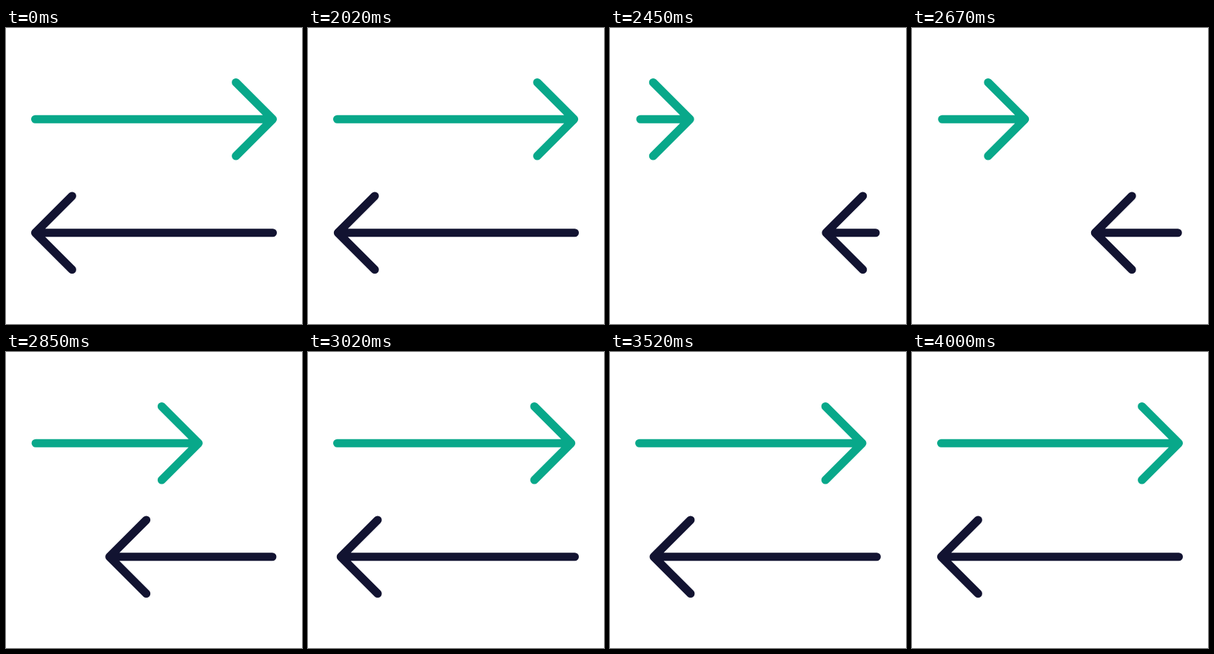
An HTML page that plays this animation: 400 by 400 pixels, repeating every 4.02 s.

```html
<!DOCTYPE html>
<html lang="en">
<head>
<meta charset="utf-8">
<title>Swap arrows</title>
<style>
  html, body { margin: 0; width: 100%; height: 100%; overflow: hidden; background: #fff; }
  svg { display: block; width: 100%; height: 100%; }
  path { fill: none; stroke-width: 11.16; stroke-linecap: round; stroke-linejoin: round; }
</style>
</head>
<body>
<svg viewBox="0 0 400 400">
  <path class="arrow" stroke="#08a88a"/>
  <path class="arrow" stroke="#121331" transform="rotate(180 200 200)"/>
</svg>
<script>
  const LOOP = 4020, STEP = 25;
  const TAIL = 39.53, TIP = 360.47, Y = 123.26, WING = 49.77;

  // [time in ms, shift of the tip in px]
  const KEYS = [[0, 0], [2000, 0], [2467, -253], [3200, 30.5], [3600, -24], [4000, 0], [LOOP, 0]];

  // cubic-bezier(.42, 0, .58, 1), solved by bisection
  function ease(x) {
    let lo = 0, hi = 1;
    for (let i = 0; i < 24; i++) {
      const s = (lo + hi) / 2, r = 1 - s;
      if (1.26 * s * r * r + 1.74 * s * s * r + s ** 3 < x) lo = s; else hi = s;
    }
    return lo * lo * (3 - 2 * lo);
  }

  function shiftAt(t) {
    const i = KEYS.findIndex(([time]) => time > t);
    const [t0, v0] = KEYS[i - 1], [t1, v1] = KEYS[i];
    return v0 === v1 ? v0 : v0 + (v1 - v0) * ease((t - t0) / (t1 - t0));
  }

  const arrows = document.querySelectorAll('.arrow');

  function draw(ms) {
    // 40 poses a second, starting on whole hundredths
    const pose = Math.floor((ms % LOOP + 5) / STEP);
    const shift = shiftAt(Math.floor(pose * STEP / 10) * 10);
    const tip = TIP + shift, back = tip - WING;
    const tail = TAIL - shift * 0.006;
    const d = `M${tail} ${Y}H${tip}M${back} ${Y - WING}L${tip} ${Y}L${back} ${Y + WING}`;
    arrows.forEach(a => a.setAttribute('d', d));
  }

  const start = performance.now();
  function tick() {
    draw(performance.now() - start);
    requestAnimationFrame(tick);
  }
  tick();
</script>
</body>
</html>
```
